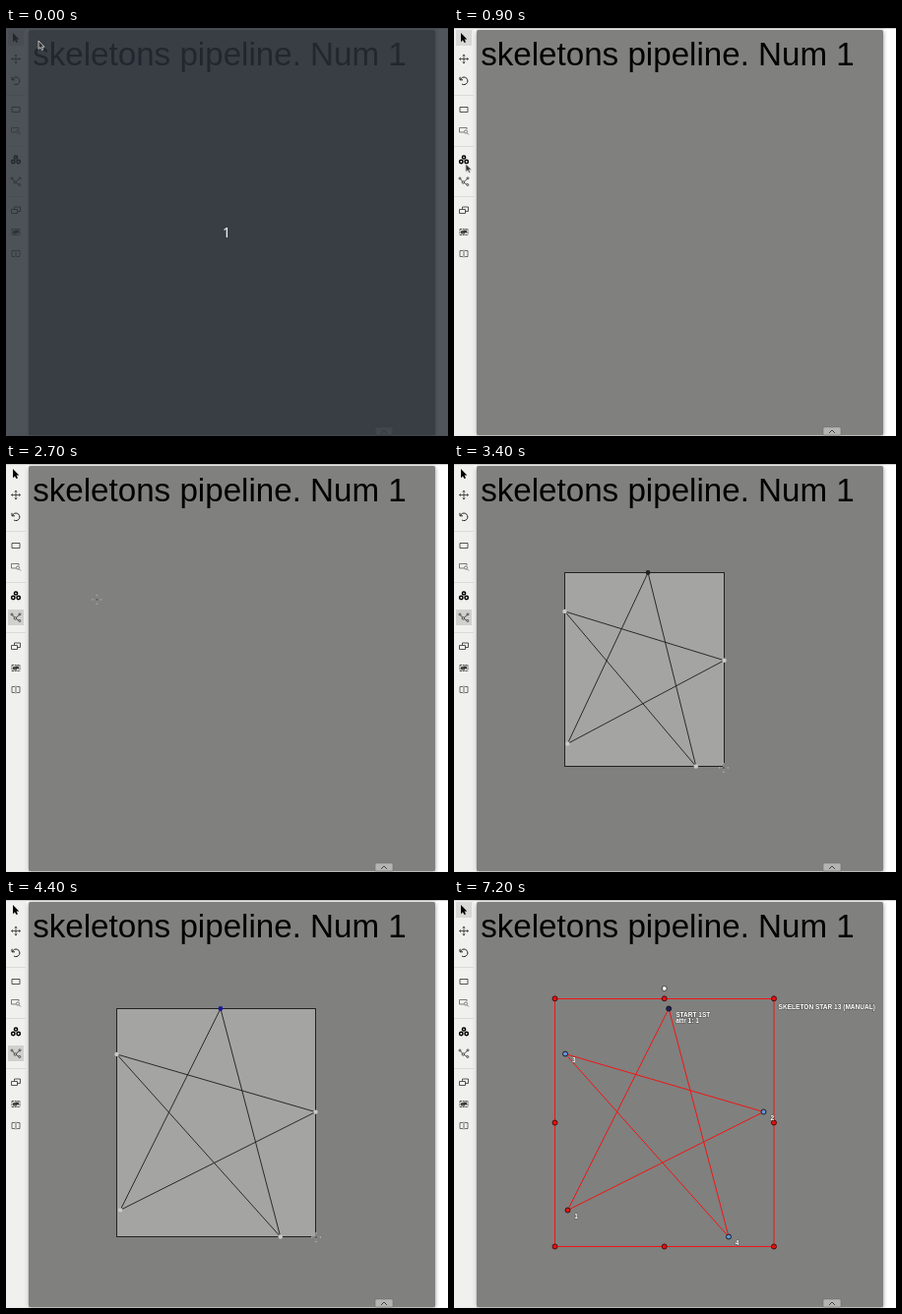
An HTML page for the animation above (8 s loop, 449 by 415 pixels).

```html
<!DOCTYPE html>
<html lang="en">
<head>
<meta charset="utf-8">
<title>Drawing a skeleton</title>
<style>
html, body { margin: 0; width: 100%; height: 100%; overflow: hidden; background: #fff; }
.layer { position: absolute; left: 0; top: 0; width: 449px; height: 415px; font: 6.6px "Liberation Sans", Arial, sans-serif; }

/* Visibility switches: all share one 8 s clock */
.anim { animation: 8s step-end infinite; }
.intro { animation-name: intro; }
.popup { animation-name: popup; }
.select-mode { animation-name: select-mode; }
.draw-mode { animation-name: draw-mode; }
.result { animation-name: result; }
.active { animation-name: active; }
.shape-hover { animation-name: shape-hover; }
.c-arrow { animation-name: c-arrow; }
.c-text { animation-name: c-text; }
.c-hand { animation-name: c-hand; }
.c-cross { animation-name: c-cross; }
.c-move { animation-name: c-move; }
@keyframes intro { 0% { opacity: 1 } 1.25%, 100% { opacity: 0 } }
@keyframes popup { 0% { opacity: 0 } 12.5% { opacity: 1 } 28.75%, 100% { opacity: 0 } }
@keyframes select-mode { 0% { opacity: 1 } 28.75% { opacity: 0 } 57.5%, 100% { opacity: 1 } }
@keyframes draw-mode { 0% { opacity: 0 } 28.75% { opacity: 1 } 57.5%, 100% { opacity: 0 } }
@keyframes result { 0% { opacity: 0 } 57.5%, 100% { opacity: 1 } }
@keyframes active { 0% { opacity: 0 } 65%, 100% { opacity: 1 } }
@keyframes shape-hover { 0% { opacity: 0 } 23.75% { opacity: 1 } 28.75%, 100% { opacity: 0 } }
@keyframes c-arrow {
  0% { opacity: 1 } 18.75% { opacity: 0 } 57.5% { opacity: 1 }
  65% { opacity: 0 } 87.5% { opacity: 1 } 90%, 100% { opacity: 0 }
}
@keyframes c-text { 0% { opacity: 0 } 18.75% { opacity: 1 } 23.75%, 100% { opacity: 0 } }
@keyframes c-hand { 0% { opacity: 0 } 23.75% { opacity: 1 } 28.75%, 100% { opacity: 0 } }
@keyframes c-cross { 0% { opacity: 0 } 28.75% { opacity: 1 } 57.5%, 100% { opacity: 0 } }
@keyframes c-move { 0% { opacity: 0 } 65% { opacity: 1 } 87.5%, 100% { opacity: 0 } }

/* Motion advances in 100 ms steps */
.cursor { animation: cursor 8s infinite; }
@keyframes cursor {
  0% { transform: translate(33px, 13px); animation-timing-function: step-end }
  1.25% { transform: translate(34px, 18px); animation-timing-function: steps(9) }
  12.5% { transform: translate(9px, 153px); animation-timing-function: step-end }
  16.25% { transform: translate(9px, 153px); animation-timing-function: steps(2) }
  18.75% { transform: translate(31px, 160px); animation-timing-function: steps(2) }
  21.25% { transform: translate(38px, 170px); animation-timing-function: steps(4) }
  26.25% { transform: translate(58px, 181px); animation-timing-function: step-end }
  27.5% { transform: translate(58px, 181px); animation-timing-function: steps(8) }
  37.5% { transform: translate(113px, 112px); animation-timing-function: steps(4) }
  42.5% { transform: translate(274px, 309px); animation-timing-function: steps(5) }
  48.75% { transform: translate(313px, 347px); animation-timing-function: steps(2) }
  51.25% { transform: translate(315px, 344px); animation-timing-function: step-end }
  55% { transform: translate(315px, 343px); animation-timing-function: step-end }
  63.75% { transform: translate(315px, 343px); animation-timing-function: steps(4) }
  68.75% { transform: translate(296px, 324px); animation-timing-function: steps(5) }
  75% { transform: translate(303px, 299px); animation-timing-function: steps(4) }
  80% { transform: translate(309px, 220px); animation-timing-function: steps(5) }
  86.25% { transform: translate(287px, 105px); animation-timing-function: step-end }
  87.5% { transform: translate(226px, 58px); animation-timing-function: step-end }
  88.75%, 100% { transform: translate(136px, 4px) }
}
.draft { position: absolute; left: 112px; top: 110px; animation: draft 8s infinite; }
.draft svg { display: block; width: 100%; height: 100%; overflow: visible; }
@keyframes draft {
  0%, 37.5% { width: 0; height: 0; animation-timing-function: steps(4) }
  42.5% { width: 162px; height: 197px; animation-timing-function: steps(5) }
  48.75% { width: 200px; height: 236px; animation-timing-function: steps(2) }
  51.25% { width: 202px; height: 234px; animation-timing-function: step-end }
  53.75% { width: 202px; height: 233px; animation-timing-function: step-end }
  55%, 100% { width: 202px; height: 232px }
}
.first { animation-name: first; }
@keyframes first { 0% { fill: #222 } 50%, 100% { fill: #1a1a98 } }

.icon { fill: none; stroke: #222; stroke-width: .75; }
.label { font-weight: bold; font-size: 6.55px; fill: #fff; stroke: #333; stroke-opacity: .55; stroke-width: 1px; paint-order: stroke; }
.dots { fill: #c9c9c7; }
.panel { filter: drop-shadow(0 1px 2px rgba(0, 0, 0, .45)); }
</style>
</head>
<body>
<svg class="layer" viewBox="0 0 449 415">
  <rect width="449" height="415" fill="#fff"/>
  <rect width="449" height="1" fill="#d2d2d0"/>
  <rect y="1" width="20.5" height="414" fill="#f0f0ee"/>
  <rect class="panel" x="23" y="2" width="413" height="412" rx="1.5" fill="#80807e"/>
  <text x="27.2" y="38" font-size="33.15">skeletons pipeline. Num 1</text>

  <!-- Toolbar -->
  <rect class="anim select-mode" x="2" y="2" width="16" height="16" fill="#d8d8d6"/>
  <rect class="anim draw-mode" x="2" y="148" width="16" height="16" fill="#d0d0ce"/>
  <path d="M0 68.5H20M0 120.5H20M0 171.5H20" stroke="#dadad8"/>
  <g class="icon">
    <path d="M7 5V14.2L9 12.2L10.5 15L12 14.3L10.6 11.6H13.3Z" fill="#000" stroke="none"/>
    <path d="M5.5 31.5H14.5M10 27V36M8.7 28.3L10 27L11.3 28.3M8.7 34.7L10 36L11.3 34.7M6.8 30.2L5.5 31.5L6.8 32.8M13.2 30.2L14.5 31.5L13.2 32.8"/>
    <path d="M6.5 52.5A3.8 3.8 0 1 1 8 57M6 49.8V52.8H9" stroke-width="1"/>
    <path d="M6 80.5H14V85.5H6Z"/>
    <path d="M10 106H5.5V101.5H13V103M13.5 107L15 108.5" stroke="#555"/>
    <circle cx="12" cy="105.5" r="1.6" stroke="#555"/>
    <g stroke-width="1.5" stroke="#000">
      <circle cx="10" cy="131.5" r="1.6"/>
      <circle cx="7.3" cy="136" r="1.7"/>
      <circle cx="12.7" cy="136" r="1.7"/>
    </g>
    <path d="M6 153L9.5 157L14 153M9.5 157L13.5 159.5"/>
    <g fill="#f0f0ee">
      <circle cx="6" cy="153" r="1"/><circle cx="14" cy="152.8" r="1"/>
      <circle cx="9.3" cy="157" r="1.2"/><circle cx="13.8" cy="159.5" r="1"/>
    </g>
    <path d="M8.5 184V182H14.5V186.5H11.5M5.5 184.5H11.5V188.5H5.5Z"/>
    <path d="M6 204.5H14M6 210.5H14M6 204.5V210.5M14 204.5V210.5" stroke-dasharray="2 .7"/>
    <path d="M7.5 206.5H11V209H7.5ZM9.5 206H12.5V208.5" fill="#555"/>
    <path d="M9 226.5H6V232.5H9M11 226.5H14V232.5H11M10 225.5V233.5" stroke="#444"/>
  </g>

  <!-- Collapsed bottom panel -->
  <path d="M375 414V407.5Q375 406 376.5 406H391.5Q393 406 393 407.5V414Z" fill="#b4b4b2" stroke="#6f6f6d" stroke-width=".6"/>
  <path d="M381 412L384 409L387 412" class="icon"/>

  <!-- Finished skeleton -->
  <g class="anim result">
    <g fill="none" stroke="#f01414">
      <rect x="102.5" y="100.5" width="222.5" height="252"/>
      <path d="M115.5 315.5L218.2 110.5L279 342.5L113 156.5L314.5 215.5Z"/>
    </g>
    <g stroke="#111" stroke-width=".9" fill="#6295d8">
      <circle cx="113" cy="156.5" r="2.5"/>
      <circle cx="314.5" cy="215.5" r="2.5"/>
      <circle cx="279" cy="342.5" r="2.5"/>
      <circle cx="115.5" cy="315.5" r="2.5" fill="#e81414"/>
      <circle cx="218.2" cy="110.5" r="2.5" fill="#20205c"/>
    </g>
  </g>
  <g class="anim active">
    <g fill="#e81010" stroke="#3a0808" stroke-width=".9">
      <circle cx="102.5" cy="100.3" r="2.5"/>
      <circle cx="213.7" cy="100.3" r="2.5"/>
      <circle cx="325" cy="100.3" r="2.5"/>
      <circle cx="102.5" cy="226.5" r="2.5"/>
      <circle cx="325" cy="226.5" r="2.5"/>
      <circle cx="102.5" cy="352.5" r="2.5"/>
      <circle cx="213.7" cy="352.5" r="2.5"/>
      <circle cx="325" cy="352.5" r="2.5"/>
      <circle cx="213.7" cy="90" r="2.5" fill="#fff" stroke="#333"/>
    </g>
    <g class="label">
      <text x="225.2" y="118.8">START 1ST</text>
      <text x="225.2" y="125.4">attr 1: 1</text>
      <text x="329.6" y="110.8">SKELETON STAR 13 (MANUAL)</text>
      <text x="122.3" y="323.8">1</text>
      <text x="321.5" y="224">2</text>
      <text x="120" y="165">3</text>
      <text x="285.8" y="350.5">4</text>
    </g>
  </g>

  <!-- Tool popup -->
  <g class="anim popup">
    <g class="panel">
      <rect x="24" y="120" width="128.5" height="73" rx="1" fill="#f0f0ee"/>
      <path d="M24.5 152.5L21 156L24.5 159.5Z" fill="#fff"/>
    </g>
    <g fill="#fff" stroke="#d6d6d4" stroke-width=".8">
      <rect x="28" y="156" width="120" height="14" stroke="#bcd0de"/>
      <rect x="28" y="175" width="60" height="14"/>
      <rect x="88" y="175" width="60" height="14"/>
      <rect class="anim shape-hover" x="28" y="175" width="60" height="14" stroke="#40a9ff"/>
    </g>
    <path d="M138.5 161.8L140.8 164L143 161.8" fill="none" stroke="#bbb" stroke-width=".8"/>
    <g fill="#222">
      <text x="27.6" y="134.3" font-weight="bold">Draw new skeleton</text>
      <text x="27.8" y="148.5">Label</text>
      <text x="33.4" y="165.2">skeleton star</text>
      <text x="58" y="184.2" text-anchor="middle">Shape</text>
      <text x="118" y="184.2" text-anchor="middle">Track</text>
    </g>
  </g>

  <rect class="anim intro" width="449" height="415" fill="#2a2f37" fill-opacity=".82"/>
  <text class="anim intro" x="224" y="213" text-anchor="middle" font-family="'Noto Sans', sans-serif" font-size="14" fill="#fff">1</text>
</svg>

<!-- Shape being drawn: percentages follow the animated box -->
<div class="draft">
  <svg class="anim draw-mode">
    <g transform="translate(.5 .5)">
      <rect width="100%" height="100%" fill="#a4a4a2" stroke="#222"/>
      <g stroke="#1c1c1c" stroke-width=".9">
        <line x1="52.2%" y1="0" x2="1.8%" y2="88.3%"/>
        <line x1="52.2%" y1="0" x2="82.3%" y2="100%"/>
        <line x1="0" y1="20%" x2="100%" y2="45.3%"/>
        <line x1="0" y1="20%" x2="82.3%" y2="100%"/>
        <line x1="1.8%" y1="88.3%" x2="100%" y2="45.3%"/>
      </g>
      <g class="dots">
        <circle cx="0" cy="20%" r="2.2"/>
        <circle cx="100%" cy="45.3%" r="2.2"/>
        <circle cx="1.8%" cy="88.3%" r="2.2"/>
        <circle cx="82.3%" cy="100%" r="2.2"/>
        <circle class="anim first" cx="52.2%" cy="0" r="2.4"/>
      </g>
    </g>
  </svg>
</div>

<!-- Pointer -->
<svg class="layer" viewBox="0 0 449 415">
  <g class="cursor">
    <path class="anim c-arrow" d="M0 0V8.5L2 6.7L3.4 9.5L4.8 8.8L3.5 6.2H6Z" fill="#333" stroke="#ddd" stroke-width=".8"/>
    <path class="anim c-text" d="M-1.5 -4H1.5M0 -4V4M-1.5 4H1.5" fill="none" stroke="#444" stroke-width=".8"/>
    <path class="anim c-hand" d="M-1 0Q0 -1.5 1 0V3.5L4 4.2Q5 5 4 8.5H-1.5L-3.5 5L-1 5.5Z" fill="#fff" stroke="#222" stroke-width=".8"/>
    <g class="anim c-cross" fill="none">
      <path d="M-4.5 0H4.5M0 -4.5V4.5" stroke="#ccc" stroke-width="2"/>
      <path d="M-4 0H4M0 -4V4" stroke="#333" stroke-width=".9"/>
    </g>
    <g class="anim c-move" fill="none">
      <path d="M-4 0H4M0 -4V4M-2 -2L0 -4L2 -2M-2 2L0 4L2 2M-2 -2L-4 0L-2 2M2 -2L4 0L2 2" stroke="#eee" stroke-width="2"/>
      <path d="M-3.5 0H3.5M0 -3.5V3.5M-1.3 -2.3L0 -3.6L1.3 -2.3M-1.3 2.3L0 3.6L1.3 2.3M-2.3 -1.3L-3.6 0L-2.3 1.3M2.3 -1.3L3.6 0L2.3 1.3" stroke="#222" stroke-width=".8"/>
    </g>
  </g>
</svg>
</body>
</html>
```
